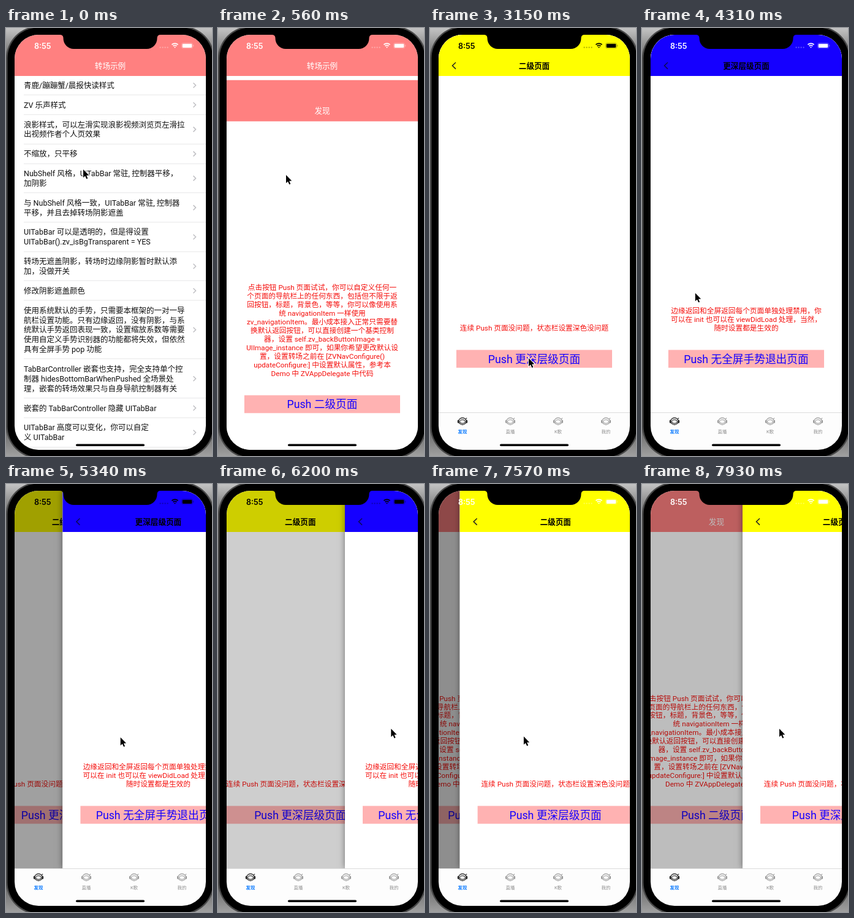
Animation, 336 px wide and 696 px high, one loop 8 s. Source, as an HTML page with a canvas:

```html
<!DOCTYPE html>
<html lang="zh-CN">
<head>
<meta charset="utf-8">
<style>
html, body { margin: 0; width: 336px; height: 696px; overflow: hidden; background: #000; }
canvas { display: block; }
</style>
</head>
<body>
<canvas id="stage" width="336" height="696"></canvas>
<script>
const ctx = document.getElementById('stage').getContext('2d');
const LOOP = 8000, LEFT = 14, TOP = 11, WIDTH = 312, HEIGHT = 675, TAB_Y = 625;
const BODY_FONT = 'Roboto, "Noto Sans CJK SC", "Noto Sans CJK", sans-serif';

const rows = [
  '青鹿/蹦蹦蟹/晨报快读样式',
  'ZV 乐声样式',
  '浪影样式，可以左滑实现浪影视频浏览页左滑拉\n出视频作者个人页效果',
  '不缩放，只平移',
  'NubShelf 风格，UITabBar 常驻, 控制器平移，\n加阴影',
  '与 NubShelf 风格一致，UITabBar 常驻, 控制器\n平移，并且去掉转场阴影遮盖',
  'UITabBar 可以是透明的，但是得设置\nUITabBar().zv_isBgTransparent = YES',
  '转场无遮盖阴影，转场时边缘阴影暂时默认添\n加，没做开关',
  '修改阴影遮盖颜色',
  '使用系统默认的手势，只需要本框架的一对一导\n航栏设置功能。只有边缘返回，没有阴影，与系\n统默认手势返回表现一致，设置缩放系数等需要\n使用自定义手势识别器的功能都将失效，但依然\n具有全屏手势 pop 功能',
  'TabBarController 嵌套也支持，完全支持单个控\n制器 hidesBottomBarWhenPushed 全场景处\n理，嵌套的转场效果只与自身导航控制器有关',
  '嵌套的 TabBarController 隐藏 UITabBar',
  'UITabBar 高度可以变化，你可以自定\n义 UITabBar'
];

const pages = [
  { title: '转场示例', bar: '#ff8080' },
  { title: '发现', bar: '#ff8080', button: 'Push 二级页面',
    body: '点击按钮 Push 页面试试，你可以自定义任何一\n个页面的导航栏上的任何东西，包括但不限于返\n回按钮，标题，背景色，等等，你可以像使用系\n统 navigationItem 一样使用\nzv_navigationItem。最小成本接入正常只需要替\n换默认返回按钮，可以直接创建一个基类控制\n器，设置 self.zv_backButtonImage =\nUIImage_instance 即可，如果你希望更改默认设\n置，设置转场之前在 [ZVNavConfigure()\nupdateConfigure:] 中设置默认属性，参考本\nDemo 中 ZVAppDelegate 中代码' },
  { title: '二级页面', bar: '#ffff00', back: '#222', button: 'Push 更深层级页面',
    body: '连续 Push 页面没问题，状态栏设置深色没问题' },
  { title: '更深层级页面', bar: '#1500ff', back: '#0a0a55', button: 'Push 无全屏手势退出页面',
    body: '边缘返回和全屏返回每个页面单独处理禁用，你\n可以在 init 也可以在 viewDidLoad 处理，当然，\n随时设置都是生效的' }
];

const linear = u => u;
const easeIn = u => u ** 1.65;
const easeOut = u => 1 - (1 - u) ** 3;
const easeInOut = u => u * u * (3 - 2 * u);
const glide = u => 1 - (1 - u) ** 1.5;

// Each slide moves page `top` between two offsets, refreshing every `step` ms.
const slides = [
  { start: 0, end: 1, step: 1, top: 0, from: 0, to: 0, ease: linear },
  { start: 300, end: 740, step: 110, top: 1, from: 590, to: 0, ease: easeOut },
  { start: 1960, end: 2260, step: 150, top: 2, from: 294, to: 0, ease: easeInOut, dark: true },
  { start: 3330, end: 3630, step: 150, top: 3, from: 294, to: 0, ease: easeInOut },
  { start: 4570, end: 6200, step: 163, top: 3, from: 2, to: 193, ease: linear, dark: true },
  { start: 6320, end: 6620, step: 150, top: 3, from: 225, to: WIDTH, ease: easeOut, dark: true },
  { start: 7330, end: 7930, step: 60, top: 2, from: 2, to: 150, ease: easeIn }
];

// pointer strokes: start, end, x, y to reach
const strokes = [
  [0, 0, 125, 229], [30, 150, 110, 238], [1100, 1240, 175, 554], [1540, 1960, 160, 536],
  [2770, 2960, 164, 511], [2960, 3150, 160, 536], [3950, 4310, 86, 430],
  [4310, 4420, 76, 427], [4570, 6200, 281, 397], [6200, 6320, 302, 395],
  [6620, 7180, 70, 424], [7330, 7930, 223, 397]
];

function rect(color, x, y, w, h, r = 0) {
  ctx.fillStyle = color;
  ctx.beginPath();
  ctx.roundRect(x, y, w, h, r);
  ctx.fill();
}

function line(color, width, ...points) {
  ctx.strokeStyle = color;
  ctx.lineWidth = width;
  ctx.beginPath();
  points.forEach(([x, y]) => ctx.lineTo(x, y));
  ctx.stroke();
}

// y is the visual middle of the text
function text(str, x, y, size, color, { align = 'center', weight = 400, family = BODY_FONT } = {}) {
  ctx.font = `${weight} ${size}px ${family}`;
  ctx.textAlign = align;
  ctx.fillStyle = color;
  ctx.fillText(str, x, y + size * 0.37);
}

function within(path, draw) {
  ctx.save();
  ctx.beginPath();
  path();
  ctx.clip();
  draw();
  ctx.restore();
}

function shifted(x, y, draw) {
  ctx.save();
  ctx.translate(x, y);
  draw();
  ctx.restore();
}

function drawList() {
  let top = 77.3;
  for (const row of rows) {
    const lines = row.split('\n');
    const height = 16 + 15.85 * lines.length, mid = top + height / 2;
    lines.forEach((str, i) =>
      text(str, 29, mid + (i - (lines.length - 1) / 2) * 15.9, 12.5, '#111', { align: 'left' }));
    line('#c0c0c4', 1.5, [305.5, mid - 4], [309.5, mid], [305.5, mid + 4]);
    top += height;
    rect('#dedee0', 29, Math.round(top) - 0.5, 297, 0.8);
  }
}

function drawPage(index) {
  const { title, bar, back, body, button } = pages[index];
  rect('#fff', LEFT, TOP, WIDTH, HEIGHT);
  rect(bar, LEFT, TOP, WIDTH, 67);
  text(title, 170, 61, 12.6, back ? '#000' : '#fff', { weight: back ? 600 : 500 });
  if (index === 0) return drawList();
  if (back) line(back, 1.5, [42, 56], [36.5, 61.3], [42, 66.6]);
  const lines = body.split('\n');
  lines.forEach((str, i) =>
    text(str, 170, 487.5 - (lines.length - 1 - i) * 13.92, 11.7, '#f50f0c'));
  rect('#ffb2b2', 43, 523.5, 254, 29);
  text(button, 170, 538, 17.7, '#1500ff');
}

function drawTabIcon(color) {
  ctx.strokeStyle = color;
  ctx.lineWidth = 1.1;
  ctx.beginPath();
  ctx.ellipse(0, 0, 6.3, 5.6, 0, 0, 7);
  ctx.moveTo(4.5, 0.5);
  ctx.ellipse(0, 0.5, 4.5, 3, 0, 0, 7);
  ctx.stroke();
  rect(color, -8, -2, 2, 5, 1);
  rect(color, 6, -2, 2, 5, 1);
  line(color, 1.1, [5, -3], [7, -5.5]);
}

function drawTabs() {
  rect('#fdfdfd', LEFT, TAB_Y, WIDTH, 61);
  rect('#d2d2d2', LEFT, TAB_Y, WIDTH, 0.8);
  ['发现', '直播', 'K歌', '我的'].forEach((label, i) => {
    const x = 53 + 78 * i;
    shifted(x, 639.5, () => drawTabIcon(i ? '#999' : '#111'));
    text(label, x, 656, 7.4, i ? '#8e8e8e' : '#0a7aff', { weight: i ? 400 : 600 });
  });
}

function drawStatus(color) {
  text('8:55', 59.7, 29, 12.6, color, { weight: 600, family: 'Inter, sans-serif' });
  ctx.globalAlpha = 0.35;
  for (let i = 0; i < 4; i++) rect(color, 250.5 + 4 * i, 30.5, 2.2, 2.2, 1.1);
  ctx.strokeStyle = color;
  ctx.lineWidth = 0.8;
  ctx.beginPath();
  ctx.roundRect(286.5, 24.5, 18, 8.6, 2.4);
  ctx.stroke();
  rect(color, 305.3, 27.3, 1, 3, 0.5);
  ctx.globalAlpha = 1;
  rect(color, 287.7, 25.7, 15.6, 6.2, 1.3);
  ctx.lineWidth = 1.8;
  for (const radius of [1.2, 4.3, 7.4]) {
    ctx.beginPath();
    ctx.arc(275.5, 32.6, radius, -Math.PI * 0.74, -Math.PI * 0.26);
    ctx.stroke();
  }
}

function drawContent(top, offset) {
  if (top < 2) {
    drawPage(0);
    if (top) shifted(0, offset, () => { drawPage(1); drawTabs(); });
    return;
  }
  within(() => ctx.rect(LEFT, TOP, WIDTH, TAB_Y - TOP), () => {
    const covered = 1 - offset / WIDTH;
    shifted(-0.3 * WIDTH * covered, 0, () => drawPage(top - 1));
    rect(`rgba(0,0,0,${covered / 2})`, LEFT, TOP, WIDTH, HEIGHT);
    ctx.save();
    ctx.shadowColor = 'rgba(0,0,0,.45)';
    ctx.shadowBlur = 10;
    rect('#fff', LEFT + offset, TOP, WIDTH, TAB_Y - TOP);
    ctx.restore();
    shifted(offset, 0, () => drawPage(top));
  });
  drawTabs();
}

function drawPhone() {
  const backdrop = ctx.createLinearGradient(0, 0, 0, 696);
  backdrop.addColorStop(0, '#c4c4c4');
  backdrop.addColorStop(0.1, '#444');
  backdrop.addColorStop(0.9, '#444');
  backdrop.addColorStop(1, '#a0a0a0');
  rect(backdrop, 0, 0, 336, 696);
  rect('#484848', 0, -3, 340, 703, 53);
  rect('#000', 2.5, -0.5, 335, 698, 50);
}

function drawNotch() {
  ctx.fillStyle = '#000';
  ctx.beginPath();
  ctx.moveTo(88, 10);
  ctx.lineTo(88, 11);
  ctx.quadraticCurveTo(93, 11, 93.5, 16);
  ctx.arcTo(93.5, 34, 110, 34, 17);
  ctx.arcTo(246.5, 34, 246.5, 16, 17);
  ctx.lineTo(246.5, 16);
  ctx.quadraticCurveTo(247, 11, 252, 11);
  ctx.lineTo(252, 10);
  ctx.fill();
}

function pointerAt(t) {
  let x = 0, y = 0;
  for (const [start, end, toX, toY] of strokes) {
    if (t < start) break;
    const k = t >= end ? 1 : glide((t - start) / (end - start));
    x += (toX - x) * k;
    y += (toY - y) * k;
  }
  return [x, y];
}

function drawPointer() {
  ctx.beginPath();
  [[1, 1], [1, 14.3], [4, 11.6], [6.3, 16.4], [8.3, 15.5], [6.2, 10.8], [10.3, 10.6]]
    .forEach(([x, y]) => ctx.lineTo(x, y));
  ctx.closePath();
  ctx.strokeStyle = '#fff';
  ctx.lineWidth = 2;
  ctx.stroke();
  ctx.fillStyle = '#000';
  ctx.fill();
}

function slideAt(t) {
  const slide = slides.findLast(s => s.start <= t);
  const { start, end, step, from, to, ease } = slide;
  const held = t < end ? start + Math.floor((t - start) / step) * step : t;
  const progress = Math.min(1, (held - start) / (end - start));
  const offset = from + (to - from) * ease(progress);
  const gone = offset >= WIDTH && slide.top > 1;
  return { held, dark: slide.dark, top: slide.top - gone, offset: gone ? 0 : offset };
}

function render(t) {
  const { held, dark, top, offset } = slideAt(t);
  drawPhone();
  within(() => ctx.roundRect(LEFT, TOP, WIDTH, HEIGHT, 39), () => {
    drawContent(top, offset);
    drawStatus(dark ? '#000' : '#fff');
    rect('#000', 114, 676.5, 112, 3.6, 1.8);
  });
  drawNotch();
  shifted(...pointerAt(held), drawPointer);
}

function tick() {
  render(performance.now() % LOOP);
  requestAnimationFrame(tick);
}
tick();
</script>
</body>
</html>
```
